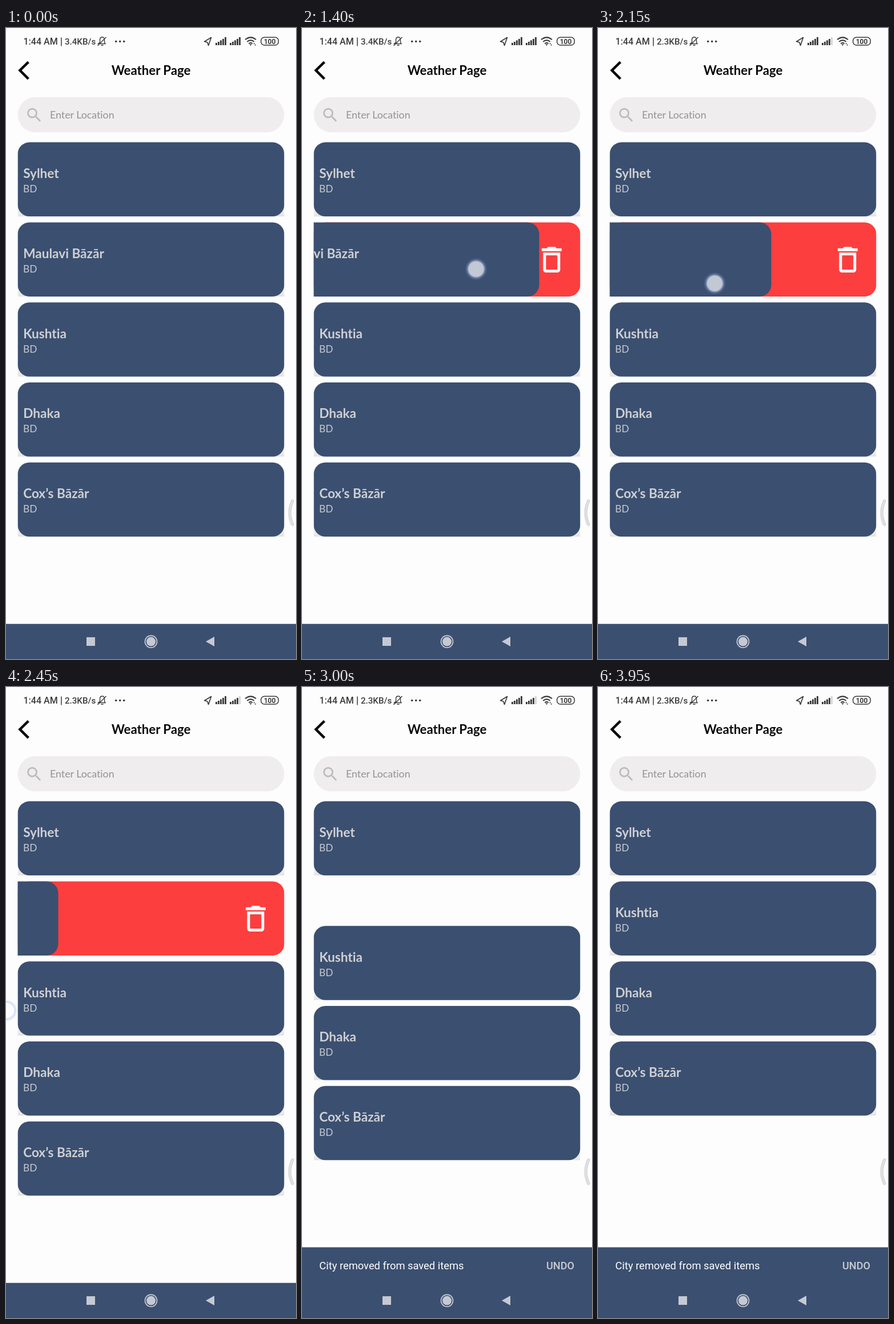
These frames come from a looping animation (508x1102 px, 4 s). An HTML page:

```html
<!DOCTYPE html>
<html lang="en">
<head>
<meta charset="utf-8">
<title>Saved cities</title>
<style>
  html, body { margin: 0; width: 100%; height: 100%; overflow: hidden; background: #fdfdfd; }
  svg { display: block; width: 100%; height: 100%; }
  text { white-space: pre; font-variant-ligatures: none; }
  .app { font-family: Lato, "Open Sans", sans-serif; }
  .sys { font-family: Roboto, Inter, sans-serif; }
  .bold { font-weight: 700; }
  .med { font-weight: 500; }
</style>
</head>
<body>
<svg viewBox="0 0 508 1102" xmlns="http://www.w3.org/2000/svg">
  <defs>
    <clipPath id="rowClip"><rect x="20.5" y="190" width="467" height="851"/></clipPath>
    <linearGradient id="shade" x1="0" y1="0" x2="0" y2="1">
      <stop offset="0" stop-color="#eee" stop-opacity="0"/>
      <stop offset="1" stop-color="#e2e2e2"/>
    </linearGradient>
    <radialGradient id="glow">
      <stop offset="0" stop-color="#fff" stop-opacity=".7"/>
      <stop offset=".66" stop-color="#fafbff" stop-opacity=".7"/>
      <stop offset=".74" stop-color="#b9c4ee" stop-opacity=".62"/>
      <stop offset=".82" stop-color="#a9b7ea" stop-opacity=".3"/>
      <stop offset="1" stop-color="#a9b7ea" stop-opacity="0"/>
    </radialGradient>
  </defs>
  <rect width="508" height="1102" fill="#fdfdfd"/>

  <g class="sys med" fill="#3b3b3b">
    <text x="30.5" y="29" font-size="16">1:44 AM</text>
    <rect x="96.2" y="16.5" width="1.5" height="15"/>
    <text id="speed" x="103" y="29" font-size="15.1"></text>
    <g fill="none" stroke="#3b3b3b" stroke-width="1.4">
      <path d="M161.500 27.500h12.500l-1.500-2.500v-4.500c0-3-1.500-4.500-4-4.500s-4 1.500-4 4.500v4.500zM166.500 30.300h4M160.500 31L175.500 16"/>
      <path d="M359.500 16.500L347.500 23.700l5.300 1.300 1.800 5.500z" stroke-width="1.700" stroke-linejoin="round"/>
    </g>
    <circle cx="192.700" cy="23.500" r="1.800"/>
    <circle cx="199.700" cy="23.500" r="1.800"/>
    <circle cx="206.700" cy="23.500" r="1.800"/>
    <g id="signal"></g>
    <path d="M419 20.300Q428.500 12.300 438 20.300M422.300 24Q428.500 18.800 434.700 24M425.300 27.300Q428.500 24.600 431.700 27.300" fill="none" stroke="#3b3b3b" stroke-width="2.100"/>
    <path d="M426.300 28.300h4.400l-2.200 2.700zM433.200 28l1.500-2 1.500 2zM435.200 29l1.500 2 1.500-2z"/>
    <rect x="446.700" y="16.300" width="30.600" height="13.800" rx="6" fill="none" stroke="#3b3b3b" stroke-width="1.500"/>
    <text x="462" y="27.600" font-size="12" text-anchor="middle" class="bold">100</text>
  </g>

  <path d="M39.300 59.300L24.400 74 39.300 88.800" fill="none" stroke="#060606" stroke-width="4.500"/>
  <text class="app bold" x="254" y="82" font-size="22.200" text-anchor="middle" fill="#0a0a0a">Weather Page</text>

  <rect x="20.700" y="120.700" width="466.600" height="61.600" rx="30.800" fill="#efeded"/>
  <path transform="translate(33 135.600) scale(1.370)" fill="#bdbbbb" d="M15.500 14h-.79l-.28-.27A6.470 6.470 0 0 0 16 9.500 6.500 6.500 0 1 0 9.500 16c1.610 0 3.090-.59 4.230-1.570l.27.28v.79l5 4.990L20.490 19zm-6 0A4.500 4.500 0 1 1 9.500 5a4.500 4.500 0 0 1 0 9z"/>
  <text class="app" x="77" y="158" font-size="17.800" fill="#949292">Enter Location</text>

  <g clip-path="url(#rowClip)">
    <g id="bin">
      <rect x="20.500" y="339.400" width="467" height="129.500" rx="20.500" fill="#fd3e3f"/>
      <path transform="translate(407.500 374.700) scale(2.490)" fill="#fff" d="M6 19c0 1.100.9 2 2 2h8c1.100 0 2-.9 2-2V7H6zM8 9h8v10H8zM15.500 4l-1-1h-5l-1 1H5v2h14V4z" fill-rule="evenodd"/>
    </g>
    <g id="cards"></g>
  </g>

  <path d="M501.800 826Q492.500 847 501.800 867" fill="none" stroke="#cfcfcf" stroke-width="5.400" stroke-linecap="round"/>
  <path d="M501.800 826Q492.500 847 501.800 867" fill="none" stroke="#e0e0e0" stroke-width="3.800" stroke-linecap="round"/>

  <g id="snack">
    <rect width="508" height="125" fill="#3b4f70"/>
    <g id="snackText" class="sys">
      <text x="30.300" y="38" font-size="18.350" fill="#fff">City removed from saved items</text>
      <text class="med" x="477" y="38" font-size="18.100" text-anchor="end" fill="#c9ccd4">UNDO</text>
    </g>
  </g>

  <rect y="1040.700" width="508" height="61.300" fill="#3b4f70"/>
  <g fill="#c6c9d3">
    <rect x="141" y="1064" width="15" height="15"/>
    <circle cx="254" cy="1071.600" r="10.500" fill="none" stroke="#c6c9d3" stroke-width="1.700"/>
    <circle cx="254" cy="1071.600" r="8"/>
    <path d="M350 1071.500L365 1063v17z"/>
  </g>

  <circle id="touch" r="19.500" fill="url(#glow)"/>
</svg>

<script>
const NS = "http://www.w3.org/2000/svg";
const LOOP = 4000, STEP = 50, PITCH = 139.8;
const byId = id => document.getElementById(id);

function add(parent, tag, attrs, text) {
  const node = document.createElementNS(NS, tag);
  for (const key in attrs) node.setAttribute(key, attrs[key]);
  if (text) node.textContent = text;
  return parent.appendChild(node);
}

const cards = ["Sylhet", "Maulavi Bāzār", "Kushtia", "Dhaka", "Cox’s Bāzār"].map(city => {
  const card = add(byId("cards"), "g", {});
  const shade = add(card, "rect", { x: 20.5, y: 103, width: 467, height: 26.5, fill: "url(#shade)" });
  add(card, "rect", { x: 20.5, width: 467, height: 129.5, rx: 20.5, fill: "#3b4f70" });
  add(card, "text", { class: "app bold", x: 30.2, y: 62.4, "font-size": 22.6, fill: "#cfd0d3" }, city);
  add(card, "text", { class: "app", x: 30, y: 87.4, "font-size": 17.3, fill: "#c6cad1" }, "BD");
  return { card, shade };
});

// Two antennas of five rising bars each
const bars = [367, 392].flatMap(x => [4, 6, 8.5, 11, 14].map((h, i) =>
  add(byId("signal"), "rect", { x: x + i * 4, y: 30 - h, width: 2.9, height: h })));

const clamp = v => Math.min(1, Math.max(0, v));
const span = (t, start, length) => clamp((t - start) / length);
const easeInOut = p => 0.5 - 0.5 * Math.cos(Math.PI * p);

// Material standard curve: cubic-bezier(.4, 0, .2, 1)
function standard(p) {
  let lo = 0, hi = 1;
  for (let i = 0; i < 24; i++) {
    const s = (lo + hi) / 2, r = 1 - s;
    if (1.2 * s * r * r + 0.6 * s * s * r + s ** 3 < p) lo = s; else hi = s;
  }
  return 3 * lo * lo * (1 - lo) + lo ** 3;
}

// Smooth path through [time, value] points without overshoot
function glide(points, t) {
  const last = points.length - 1;
  if (t <= points[0][0]) return points[0][1];
  if (t >= points[last][0]) return points[last][1];
  const slope = i => (points[i + 1][1] - points[i][1]) / (points[i + 1][0] - points[i][0]);
  const tangent = i => {
    if (i === 0) return 0;
    if (i === last) return slope(last - 1);
    const a = slope(i - 1), b = slope(i);
    return a * b > 0 ? 2 * a * b / (a + b) : 0;
  };
  const i = points.findIndex(p => p[0] > t) - 1;
  const [t0, v0] = points[i], [t1, v1] = points[i + 1];
  const d = t1 - t0, s = (t - t0) / d, r = 1 - s;
  return v0 * (1 + 2 * s) * r * r + tangent(i) * d * s * r * r
       + v1 * s * s * (3 - 2 * s) - tangent(i + 1) * d * s * s * r;
}

const drag = [[1050, 0], [1400, -72], [2150, -184], [2450, -396], [2490, -416]];
const touchX = [[1000, 388], [1400, 305], [2150, 204.5], [2450, 1], [2500, -36]];
const touchY = [[1000, 405], [1400, 421], [2150, 446], [2450, 565], [2500, 590]];

const place = (node, x, y) => node.setAttribute("transform", `translate(${x} ${y})`);
const show = (node, on) => node.setAttribute("visibility", on ? "visible" : "hidden");

function draw(t) {
  const slow = t >= 1700;
  byId("speed").textContent = slow ? "2.3KB/s" : "3.4KB/s";
  bars[9].setAttribute("fill", slow ? "#d2d2d2" : "#3b3b3b");

  const swipe = glide(drag, t) - 54 * easeInOut(span(t, 2490, 240));
  const lift = PITCH * easeInOut(span(t, 2884, 250));
  cards.forEach(({ card }, i) =>
    place(card, i === 1 ? swipe : 0, 199.6 + PITCH * i - (i > 1 ? lift : 0)));
  show(cards[1].card, t < 2740);
  show(cards[1].shade, swipe === 0 && t < 2740);

  const fade = 1 - easeInOut(span(t, 2749, 120));
  show(byId("bin"), swipe < 0 && fade > 0);
  byId("bin").setAttribute("opacity", fade);

  show(byId("touch"), t >= 900 && t < 2500);
  place(byId("touch"), glide(touchX, t), glide(touchY, t));

  place(byId("snack"), 0, 1040.7 - 62.2 * standard(span(t, 2733, 250)));
  show(byId("snack"), t > 2733);
  byId("snackText").setAttribute("opacity", standard(span(t, 2810, 180)));
}

const start = performance.now();
function tick() {
  const t = (performance.now() - start) % LOOP;
  draw(Math.floor(t / STEP) * STEP);
  requestAnimationFrame(tick);
}
tick();
</script>
</body>
</html>
```
